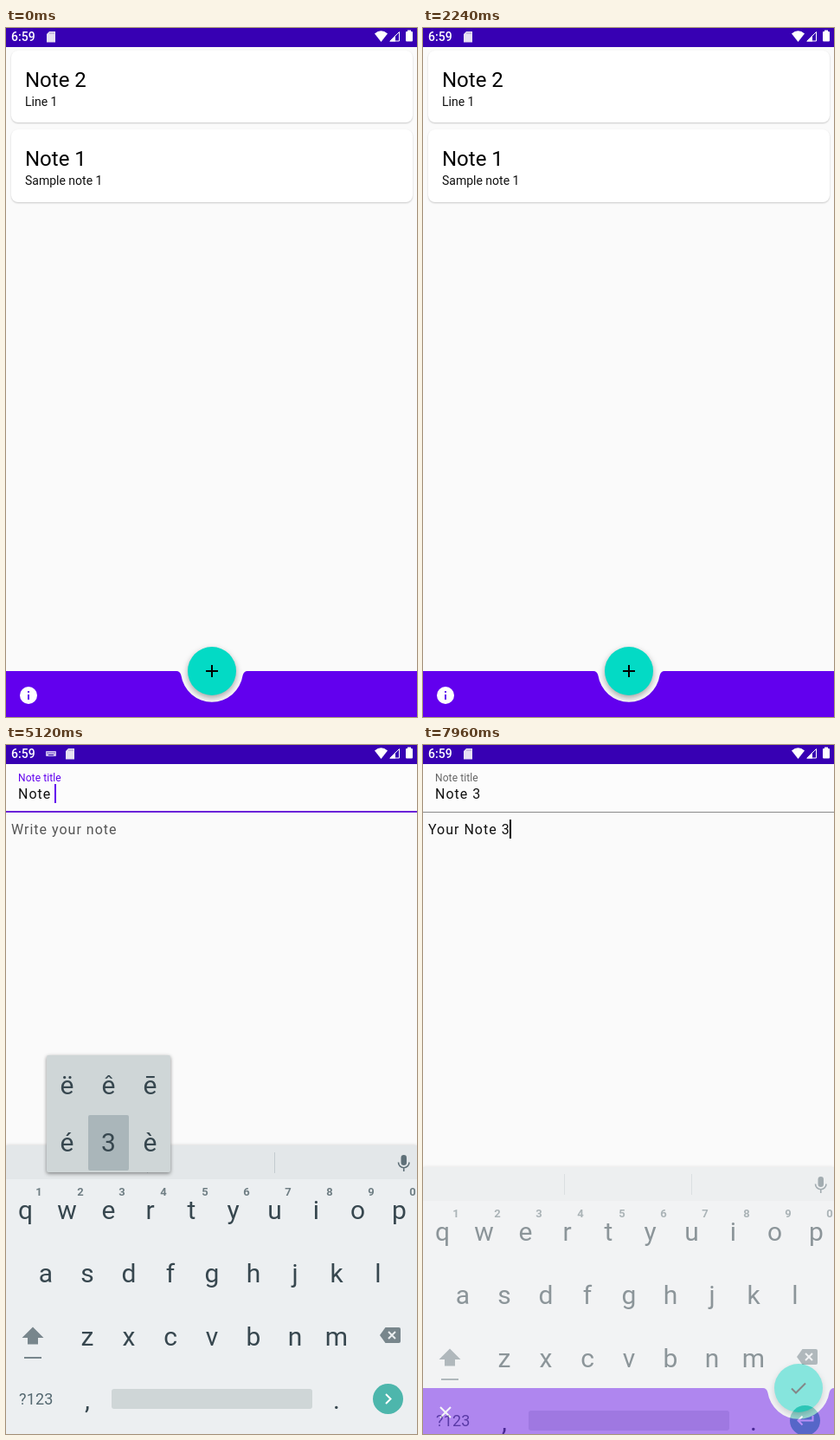
These frames come from a looping animation (475x795 px, 8000 ms). An HTML page with a canvas:

```html
<!DOCTYPE html>
<html lang="en">
<head>
<meta charset="utf-8">
<title>Notes app</title>
<style>
  html, body { margin: 0; width: 100%; height: 100%; overflow: hidden; background: #fafafa; }
  canvas { position: absolute; left: 0; top: 0; }
</style>
</head>
<body>
<canvas id="app" width="475" height="795"></canvas>
<canvas id="keyboard" width="475" height="795"></canvas>
<script>
const LOOP = 8000, W = 475, H = 795;
const PURPLE = '#6200ee', TEAL = '#03dac5', KEY_TEXT = '#37474f', KEY_GREY = '#78868c', PRESSED = '#cfd6d7';
const keyboard = document.getElementById('keyboard');
const appCtx = document.getElementById('app').getContext('2d');
const keyCtx = keyboard.getContext('2d');
let c = appCtx;

const ramp = (t, a, b) => Math.min(1, Math.max(0, (t - a) / (b - a)));
const easeOut = p => 1 - (1 - p) ** 2;
const within = (t, a, b) => t >= a && t < b;

function text(s, x, y, size, color, { weight = 400, spacing = 0, align = 'left' } = {}) {
  c.font = `${weight} ${size}px Roboto, sans-serif`;
  c.letterSpacing = spacing + 'px';
  c.textAlign = align;
  c.fillStyle = color;
  c.fillText(s, x, y);
  return c.measureText(s).width;
}
function rect(x, y, w, h, color, r = 0) {
  c.fillStyle = color;
  c.beginPath();
  c.roundRect(x, y, w, h, r);
  c.fill();
}
function circle(x, y, r, color) {
  c.fillStyle = color;
  c.beginPath();
  c.arc(x, y, r, 0, 7);
  c.fill();
}
function fill(d, color) {
  c.fillStyle = color;
  c.fill(new Path2D(d));
}
function stroke(d, color, width = 2) {
  c.strokeStyle = color;
  c.lineWidth = width;
  c.stroke(new Path2D(d));
}
function shadowed(blur, dy, alpha, draw) {
  c.save();
  c.shadowColor = `rgba(0,0,0,${alpha})`;
  c.shadowBlur = blur;
  c.shadowOffsetY = dy;
  draw();
  c.restore();
}

// Key strokes: [press, release, character]; a hold over 300 ms opens the alternatives panel
const title = [[4240, 4360, 'N'], [4430, 4490, 'o'], [4530, 4580, 't'], [4630, 4690, 'e'],
  [4720, 4780, ' '], [4820, 5280, '3']];
const body = [[5900, 5980, 'Y'], [6120, 6180, 'o'], [6260, 6320, 'u'], [6400, 6450, 'r'], [6520, 6570, ' '],
  [6740, 6800, 'N'], [6860, 6910, 'o'], [6950, 6990, 't'], [7030, 7080, 'e'], [7100, 7130, ' '], [7140, 7640, '3']];
const strokes = [...title, ...body];
const typed = (keys, t) => keys.filter(k => t >= k[1]).map(k => k[2]).join('');
const suggestions = {
  N: 'No Not Now', No: 'Not No Now', Not: 'Notes Nor Notable', Note: 'Notes Note Noted',
  Y: 'You By Years', Yo: 'You To York', You: 'Your You Young', Your: 'Yours Your Yourself'
};
const BODY_FOCUS = 5480, EDIT_START = 3840;

function statusIcons(t) {
  const typing = within(t, 3920, 7870), x = typing ? 69 : 47;
  text('6:59', 6, 15, 14, '#fff', { weight: 500 });
  if (typing) {
    rect(46, 7, 12, 6, 'rgba(255,255,255,.75)', 1);
    for (let i = 0; i < 5; i++) rect(47.5 + i * 2, 8.5, 1, 1, '#3700b3');
    rect(49, 11, 6, 1, '#3700b3');
  }
  fill(`M${x} 7l3-3h7v12.5h-10z`, '#e6e0f3');
  for (let i = 0; i < 3; i++) rect(x + 3.5 + i * 2, 5, 1, 2, '#a99bc9');
  fill('M433.5 16L426 6.5Q433.5 0 441 6.5Z', '#fff');
  stroke('M444 15H454.500V4.500Z', '#fff', 1);
  fill('M443 15.500H450V8.500Z', '#fff');
  rect(462, 4, 8, 11.5, '#fff', 1);
  rect(464, 2.5, 4, 2, '#fff');
}

function bottomBar(cx) {
  fill(`M0 742H${cx - 41}Q${cx - 37} 742 ${cx - 35.6} 747A36 36 0 0 0 ${cx + 35.6} 747Q${cx + 37} 742 ${cx + 41} 742H${W}V${H}H0Z`, PURPLE);
  shadowed(7, 3, .35, () => circle(cx, 742, 28, TEAL));
}

function card(y, h, heading, line) {
  shadowed(2, 1, .2, () => rect(6, y, 464, h, '#fff', 8));
  text(heading, 22, y + 42, 24, '#000');
  text(line, 22, y + 64, 14, '#111');
}

function listScreen(t) {
  card(26, 83, 'Note 2', 'Line 1');
  card(117, 84, 'Note 1', 'Sample note 1');
  bottomBar(238);
  if (t >= 3760) circle(238, 742, 28 * ramp(t, 3720, 3840), 'rgba(255,255,255,.24)');
  stroke('M231 742H245M238 735V749', '#000');
  if (within(t, 960, 1240)) {
    circle(26, 770, 24 * easeOut(ramp(t, 920, 1100)), `rgba(255,255,255,${.12 * (1 - ramp(t, 1160, 1240))})`);
  }
  circle(26, 770, 10, '#fff');
  rect(25, 765, 2, 2, PURPLE);
  rect(25, 769, 2, 6, PURPLE);
}

const help = ['This app is for creating and', 'saving your text notes.', 'To create a note - click on',
  'the round button with the', 'plus icon.', 'To edit a note - select your', 'note from the list and click',
  'on it.', 'To delete a note - select it', 'and make a long click on it', 'until it is deleted.'];

function dialog(t) {
  const shown = ramp(t, 960, 1140) * (1 - ramp(t, 2100, 2230));
  if (!shown) return;
  rect(0, 0, W, H, `rgba(0,0,0,${.5 * shown})`);
  const scale = .9 + .1 * easeOut(ramp(t, 980, 1160));
  c.save();
  c.globalAlpha = shown;
  c.translate(238, 410);
  c.scale(scale, scale);
  c.translate(-238, -410);
  rect(98, 228, 280, 364, '#fff', 4);
  text('How use?', 122, 274, 20, '#212121', { weight: 500, spacing: .1 });
  help.forEach((line, i) => text(line, 122, 317 + i * 19, 16, '#666', { spacing: 1 }));
  shadowed(3, 1.5, .4, () => rect(306, 548, 64, 36, PURPLE, 4));
  if (t >= 2040) {
    c.save();
    c.beginPath();
    c.roundRect(306, 548, 64, 36, 4);
    c.clip();
    circle(338, 566, 40 * ramp(t, 2010, 2120), 'rgba(255,255,255,.24)');
    c.restore();
  }
  text('OK', 328, 572, 14, '#fff', { weight: 500, spacing: 1.25 });
  c.restore();
}

function field(s, x, base, focused, cursor) {
  const w = text(s, x, base, 16, '#111', { spacing: 1 });
  if (!focused) return;
  const word = s.match(/[a-z]+$/i);
  if (word) {
    const start = c.measureText(s.slice(0, word.index)).width;
    rect(x + start, base + 1.5, w - start, 1, '#222');
  }
  rect(Math.round(x + w) - 1, base - 17, 2, 22, cursor);
}

function editScreen(t) {
  const inBody = t >= BODY_FOCUS, float = easeOut(ramp(t, EDIT_START, 4000)), note = typed(body, t);
  rect(0, 22, W, 55, '#fcfcfc');
  text('Note title', 14, 55 - 13 * float, 16 - 4 * float, inBody ? '#666' : PURPLE, { spacing: .1 });
  field(typed(title, t), 14, 62, !inBody, PURPLE);
  if (inBody) rect(0, 77, W, 1, '#8a8a8a');
  else rect(0, 76, W, 2, '#6a22d8');
  if (!note) text('Write your note', 6, 103, 16, '#555', { spacing: 1 });
  field(note, 6, 103, inBody, '#000');
  bottomBar(434);
  stroke('M426 742.500L431 747.500L442 736.500', '#000');
  stroke('M20 764L32 776M32 764L20 776', '#fff');
}

const rows = [['qwertyuiop', 22.5], ['asdfghjkl', 46], ['zxcvbnm', 94]];
const center = { align: 'center' };

function strip(t) {
  shadowed(4, 0, .18, () => rect(0, 462, W, 39, '#e3e7e9'));
  rect(0, 501, W, 294, '#eceff1');
  rect(163, 470, 1, 24, '#c3cbcf');
  rect(310, 470, 1, 24, '#c3cbcf');
  const current = t < BODY_FOCUS ? title : body;
  const word = typed(current, t - 50).split(' ').pop();
  if (suggestions[word] && !typed(current, t).endsWith(' ')) {
    suggestions[word].split(' ').forEach((s, i) => text(s, [98, 237, 376.5][i], 490, 18, '#6b7a81', center));
    for (let i = -1; i < 2; i++) circle(236 + i * 5, 498.5, 1.5, KEY_TEXT);
  }
  rect(456.5, 473, 6.5, 12, '#5f7078', 3.25);
  stroke('M453.500 481.500a6.250 6.250 0 0 0 12.500 0M459.750 488V492', '#5f7078', 1.6);
}

function popup(x, row, letter, down) {
  const top = 439 + 72 * row;
  if (down) rect(x - 20, top + 70, 40, 54, PRESSED);
  shadowed(3, 1.5, .5, () => rect(x - 24.5, top, 49, 113, PRESSED, 2));
  text(letter, x, top + 48, 42, KEY_TEXT, center);
  for (let i = 0; i < 3; i++) rect(x + 10 + i * 5, top + 52.5, 2, 2, '#8d9a9f');
}

function alternatives() {
  shadowed(4, 1.5, .45, () => rect(47, 358, 143, 135, PRESSED, 2));
  rect(95, 427, 47, 64, '#aab6ba', 2);
  [...'ëêēé3è'].forEach((s, i) => text(s, 70.5 + i % 3 * 48, i < 3 ? 403 : 469, 30, KEY_TEXT, center));
}

function drawKeyboard(t) {
  const empty = !typed(t < BODY_FOCUS ? title : body, t);
  const upper = empty || within(t, 6660, 6800);
  strip(t);
  rows.forEach(([letters, x0], r) => [...letters].forEach((s, i) => {
    text(upper ? s.toUpperCase() : s, x0 + i * 48, 547 + r * 73, 30, KEY_TEXT, center);
    if (!r) text((i + 1) % 10, 38 + i * 48, 520, 13, '#6f7e84', { weight: 700, align: 'center' });
  }));
  const shift = upper ? '#4db6ac' : KEY_GREY;
  fill('M31 671.500L43.500 684H37V691.500H25V684H18.500Z', shift);
  rect(21, 706, 20, 2, shift);
  fill('M432 681L438.500 672H454Q456 672 456 674V688Q456 690 454 690H438.500Z', KEY_GREY);
  stroke('M442 677L450 685M450 677L442 685', '#eceff1');
  text('?123', 15, 761, 18, '#546870', { spacing: .2 });
  text(',', 94, 766, 30, KEY_TEXT, center);
  text('.', 382, 766, 30, KEY_TEXT, center);
  rect(122, 743, 232, 23, PRESSED, 3);
  circle(441.5, 754.5, 17.5, '#4db6ac');
  stroke(t < BODY_FOCUS ? 'M439 749L444.500 754.500L439 760' : 'M450.500 749V754.500H433.500M438.500 749.500L433.500 754.500L438.500 759.500', '#fff');

  for (const [press, release, char] of strokes) {
    const long = char === '3', letter = long ? 'e' : char;
    const end = long ? press + 300 : release + 60;
    if (letter !== ' ' && within(t, press, end)) {
      const r = rows.findIndex(([s]) => s.includes(letter.toLowerCase()));
      const x = rows[r][1] + 48 * rows[r][0].indexOf(letter.toLowerCase());
      popup(x, r, letter, t < release);
    }
    if (long && within(t, end, release)) alternatives();
  }
}

function draw(now) {
  const t = now % LOOP;
  c = appCtx;
  rect(0, 0, W, H, '#fafafa');
  rect(0, 0, W, 22, '#3700b3');
  if (t < EDIT_START) {
    listScreen(t);
    dialog(t);
  } else {
    editScreen(t);
  }
  statusIcons(t);

  const shown = easeOut(ramp(t, 3880, 4080)) * (1 - ramp(t, 7860, 8090));
  keyboard.style.opacity = shown;
  keyboard.style.transform = `translateY(${Math.round(58 * (1 - shown))}px)`;
  c = keyCtx;
  c.clearRect(0, 0, W, H);
  if (shown) drawKeyboard(t);
  requestAnimationFrame(() => draw(performance.now()));
}
draw(performance.now());
</script>
</body>
</html>
```
